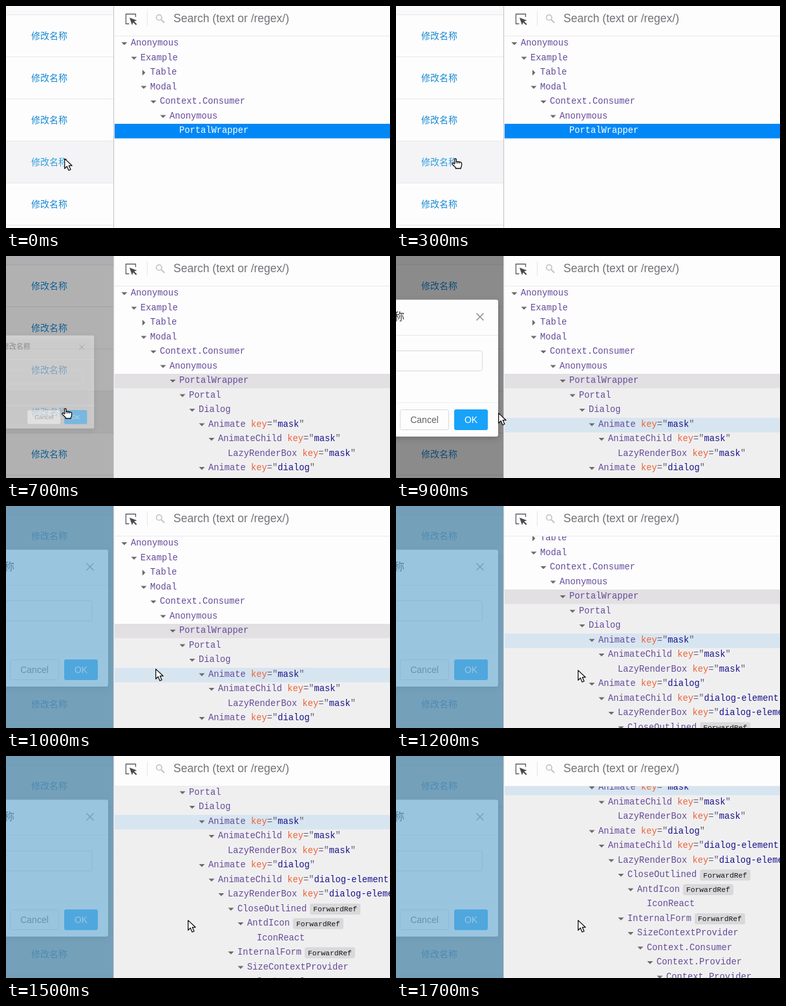
Animation, 594 px wide and 343 px high, one loop 1.8 s. Source, as an HTML page with a canvas:

```html
<!DOCTYPE html>
<html lang="zh-CN">
<head>
<meta charset="utf-8">
<title>Modal in the component tree</title>
<style>
html, body { margin: 0; width: 100%; height: 100%; overflow: hidden; background: #fefdfe; }
canvas { display: block; width: 594px; height: 343px; }
</style>
</head>
<body>
<canvas id="stage" width="594" height="343"></canvas>
<script>
const ctx = document.getElementById('stage').getContext('2d');
const LOOP = 1800, W = 594, H = 343, SPLIT = 168, BAR = 46;
const ROW = 22.5, CHAR = 8.25;
const SANS = '"Liberation Sans", Arial, sans-serif';
const MONO = '"Liberation Mono", monospace';
const CJK = '"Noto Sans CJK SC", "Noto Sans CJK", sans-serif';

// level, name, key, badge, state: open | closed | leaf
const node = (level, name, opts = {}) => ({ level, name, state: 'open', ...opts });
const badge = { badge: 'ForwardRef' };
const tree = [
  node(0, 'Anonymous'),
  node(1, 'Example'),
  node(2, 'Table', { state: 'closed' }),
  node(2, 'Modal'),
  node(3, 'Context.Consumer'),
  node(4, 'Anonymous'),
  node(5, 'PortalWrapper'),
  node(6, 'Portal'),
  node(7, 'Dialog'),
  node(8, 'Animate', { key: 'mask' }),
  node(9, 'AnimateChild', { key: 'mask' }),
  node(10, 'LazyRenderBox', { key: 'mask', state: 'leaf' }),
  node(8, 'Animate', { key: 'dialog' }),
  node(9, 'AnimateChild', { key: 'dialog-element' }),
  node(10, 'LazyRenderBox', { key: 'dialog-element' }),
  node(11, 'CloseOutlined', badge),
  node(12, 'AntdIcon', badge),
  node(13, 'IconReact', { state: 'leaf' }),
  node(11, 'InternalForm', badge),
  node(12, 'SizeContextProvider'),
  node(13, 'Context.Consumer'),
  node(14, 'Context.Provider'),
  node(15, 'Context.Provider'),
];
const SELECTED = 6, HOVERED = 9;

// Each step changes only the listed properties and holds until the next one.
const steps = [
  { at: 0, cursor: 'arrow', x: 90, y: 235, mask: 0, zoom: 0, fade: 0, scroll: 0,
    focused: true, expanded: false, hover: false, overlay: false, rowHover: true },
  { at: 300, cursor: 'hand', x: 86, y: 235 },
  { at: 500, focused: false },
  { at: 600, mask: 0.12, expanded: true },
  { at: 700, mask: 0.3, zoom: 0.68, fade: 0.45 },
  { at: 800, mask: 0.43, zoom: 0.97, fade: 0.95, x: 118, y: 239, rowHover: false },
  { at: 900, mask: 0.45, zoom: 1, fade: 1, cursor: 'arrow', x: 158, y: 242, hover: true },
  { at: 1000, overlay: true, x: 231, y: 251 },
  { at: 1100, x: 281, y: 253 },
  { at: 1200, scroll: 53 },
  { at: 1300, scroll: 107 },
  { at: 1400, scroll: 132 },
  { at: 1500, scroll: 159 },
  { at: 1700, scroll: 211.5 },
];
const stateAt = t => Object.assign({}, ...steps.filter(s => s.at <= t));

function rect(x, y, w, h, fill) {
  ctx.fillStyle = fill;
  ctx.fillRect(x, y, w, h);
}

function box(x, y, w, h, r, fill, stroke) {
  ctx.beginPath();
  ctx.roundRect(x, y, w, h, r);
  if (fill) { ctx.fillStyle = fill; ctx.fill(); }
  if (stroke) { ctx.strokeStyle = stroke; ctx.lineWidth = 1; ctx.stroke(); }
}

function text(str, x, y, font, fill, align = 'left') {
  ctx.font = font;
  ctx.fillStyle = fill;
  ctx.textAlign = align;
  ctx.fillText(str, x, y);
}

function line(color, width, ...points) {
  ctx.beginPath();
  points.forEach(([x, y], i) => i ? ctx.lineTo(x, y) : ctx.moveTo(x, y));
  ctx.strokeStyle = color;
  ctx.lineWidth = width;
  ctx.stroke();
}

function polygon(fill, ...points) {
  ctx.beginPath();
  points.forEach(([x, y]) => ctx.lineTo(x, y));
  ctx.closePath();
  ctx.fillStyle = fill;
  ctx.fill();
}

function drawModal(s) {
  if (!s.fade) return;
  ctx.save();
  ctx.globalAlpha = s.fade;
  ctx.translate(90, 240);
  ctx.scale(s.zoom, s.zoom);
  ctx.translate(-90, -240);
  ctx.save();
  ctx.shadowColor = 'rgba(0,0,0,.2)';
  ctx.shadowBlur = 10;
  ctx.shadowOffsetY = 3;
  box(-362, 67.5, 520, 211.5, 3, '#fefdfe');
  ctx.restore();
  rect(-362, 122, 520, 1, '#e9e8ea');
  rect(-362, 226, 520, 1, '#f0eff1');
  text('修改名称', 13, 99, '16px ' + CJK, '#3b3a3c', 'right');
  line('#8b8a8d', 1.5, [124.5, 88.5], [135.5, 99.5]);
  line('#8b8a8d', 1.5, [135.5, 88.5], [124.5, 99.5]);
  box(-338.5, 146.5, 472, 31, 3, null, '#d7d6d9');
  box(6.5, 237.5, 75, 31, 3, '#fefdfe', '#d7d6d9');
  text('Cancel', 44, 258, '14px ' + SANS, '#626164', 'center');
  box(90, 237, 52, 32, 3, '#18a3f9');
  text('OK', 116, 258, '14px ' + SANS, '#fff', 'center');
  ctx.restore();
}

function drawPage(s) {
  ctx.save();
  ctx.beginPath();
  ctx.rect(0, 0, 166, H);
  ctx.clip();
  rect(0, 0, 166, H, '#fefdfe');
  rect(0, 0, 166, 13, '#f9f8fa');
  if (s.rowHover) rect(0, 209, 166, 64, '#f4f3f5');
  for (let i = 0; i < 6; i++) {
    const y = 13 + i * 65;
    rect(0, y, 166, 1, '#e9e8ea');
    const hot = s.rowHover && i === 3;
    text('修改名称', 39, y + 38, '14px ' + CJK, hot ? '#2d9fe0' : '#1689d2');
  }
  rect(0, 0, 166, H, `rgba(0,0,0,${s.mask})`);
  drawModal(s);
  if (s.overlay) rect(0, 0, 166, H, 'rgba(107,170,209,.67)');
  ctx.restore();
  rect(166, 0, 1, H, '#c9c8cb');
  rect(167, 0, 1, H, '#f3f2f4');
}

function drawNode(n, i, top, s) {
  const x = 193 + n.level * 15, base = top + 14;
  const active = i === SELECTED && s.focused;
  const font = '13.75px ' + MONO;
  text(n.name, x, base, font, active ? '#fff' : '#654b98');
  let end = x + n.name.length * CHAR;

  if (n.key) {
    const parts = [[' key', '#ec6338'], ['="', '#625c78'], [n.key, '#17138a'], ['"', '#625c78']];
    for (const [str, color] of parts) {
      text(str, end, base, font, color);
      end += str.length * CHAR;
    }
  }
  if (n.badge) {
    box(end + 5, top + 2.5, 78, 17, 3, '#d9d8da');
    text(n.badge, end + 10, top + 14.5, '11.3px ' + MONO, '#141315');
  }

  const ax = x - 10, ay = top + 11;
  const leaf = n.state === 'leaf' || (i === SELECTED && !s.expanded);
  if (n.state === 'closed') polygon('#6b6a6e', [ax - 2, ay - 4.5], [ax + 2.5, ay], [ax - 2, ay + 4.5]);
  else if (!leaf) polygon('#6b6a6e', [ax - 4.5, ay - 2], [ax + 4.5, ay - 2], [ax, ay + 2.5]);
}

function drawTree(s) {
  ctx.save();
  ctx.beginPath();
  ctx.rect(SPLIT, BAR, W - SPLIT, H - BAR);
  ctx.clip();
  const topOf = i => 47 + i * ROW - s.scroll;
  const band = (i, color) => rect(SPLIT, Math.round(topOf(i)), W - SPLIT, 22.5, color);
  if (s.expanded) rect(SPLIT, topOf(SELECTED + 1), W - SPLIT, H + s.scroll, '#f0eff0');
  band(SELECTED, s.focused ? '#0288f6' : '#e2e0e3');
  if (s.hover) band(HOVERED, '#d7e5f0');
  const shown = s.expanded ? tree : tree.slice(0, SELECTED + 1);
  shown.forEach((n, i) => drawNode(n, i, topOf(i), s));
  ctx.restore();
}

function drawToolbar() {
  rect(SPLIT, 0, W - SPLIT, BAR, '#fefdfe');
  rect(SPLIT, BAR, W - SPLIT, 1, '#ebeaec');
  line('#5c5b60', 1.3, [190.5, 27.5], [185.5, 27.5], [185.5, 12.5], [200.5, 12.5], [200.5, 17]);
  polygon('#49484d', [191, 18], [202.5, 22.2], [198.2, 23.8], [202.5, 28], [201, 29.5],
    [196.8, 25.3], [195, 29.5]);
  rect(218, 8, 1, 23, '#e6e5e7');
  ctx.beginPath();
  ctx.arc(236.8, 17.8, 4.2, 0, Math.PI * 2);
  ctx.strokeStyle = '#c5c4c7';
  ctx.lineWidth = 1.7;
  ctx.stroke();
  line('#c5c4c7', 2.2, [240, 21], [245, 26]);
  text('Search (text or /regex/)', 259, 25, '17.5px ' + SANS, '#747277');
}

const cursors = {
  arrow: new Path2D('M.7 .9V16.2L4.3 12.8L7 19L10 17.7L7.3 11.7H12.2Z'),
  hand: new Path2D('M4.5 9V2Q4.5 .7 5.7 .7Q7 .7 7 2V5.5Q8.5 4.6 9.5 5.8' +
    'Q11 5 12 6.3Q13.2 5.6 14.3 6.6Q15.6 6.6 15.6 8V11Q15.4 13 14.3 14.8V16H6.2V14.5' +
    'L1.2 9.7Q.2 8.5 1.3 7.7Q2.3 7.2 3.2 8Z'),
};

function drawCursor(s) {
  ctx.save();
  ctx.translate(s.x, s.y);
  ctx.lineJoin = 'round';
  ctx.fillStyle = '#fff';
  ctx.fill(cursors[s.cursor]);
  ctx.strokeStyle = '#111';
  ctx.lineWidth = 1.3;
  ctx.stroke(cursors[s.cursor]);
  if (s.cursor === 'hand') {
    line('#111', 1, [7, 5.5], [7, 8.5]);
    line('#111', 1, [9.6, 6], [9.6, 8.5]);
    line('#111', 1, [12.2, 6.5], [12.2, 8.5]);
  }
  ctx.restore();
}

function render(time) {
  const s = stateAt(time % LOOP);
  rect(0, 0, W, H, '#fefdfe');
  drawPage(s);
  drawTree(s);
  drawToolbar();
  drawCursor(s);
}

const start = performance.now();
function tick() {
  render(performance.now() - start);
  requestAnimationFrame(tick);
}
tick();
</script>
</body>
</html>
```
